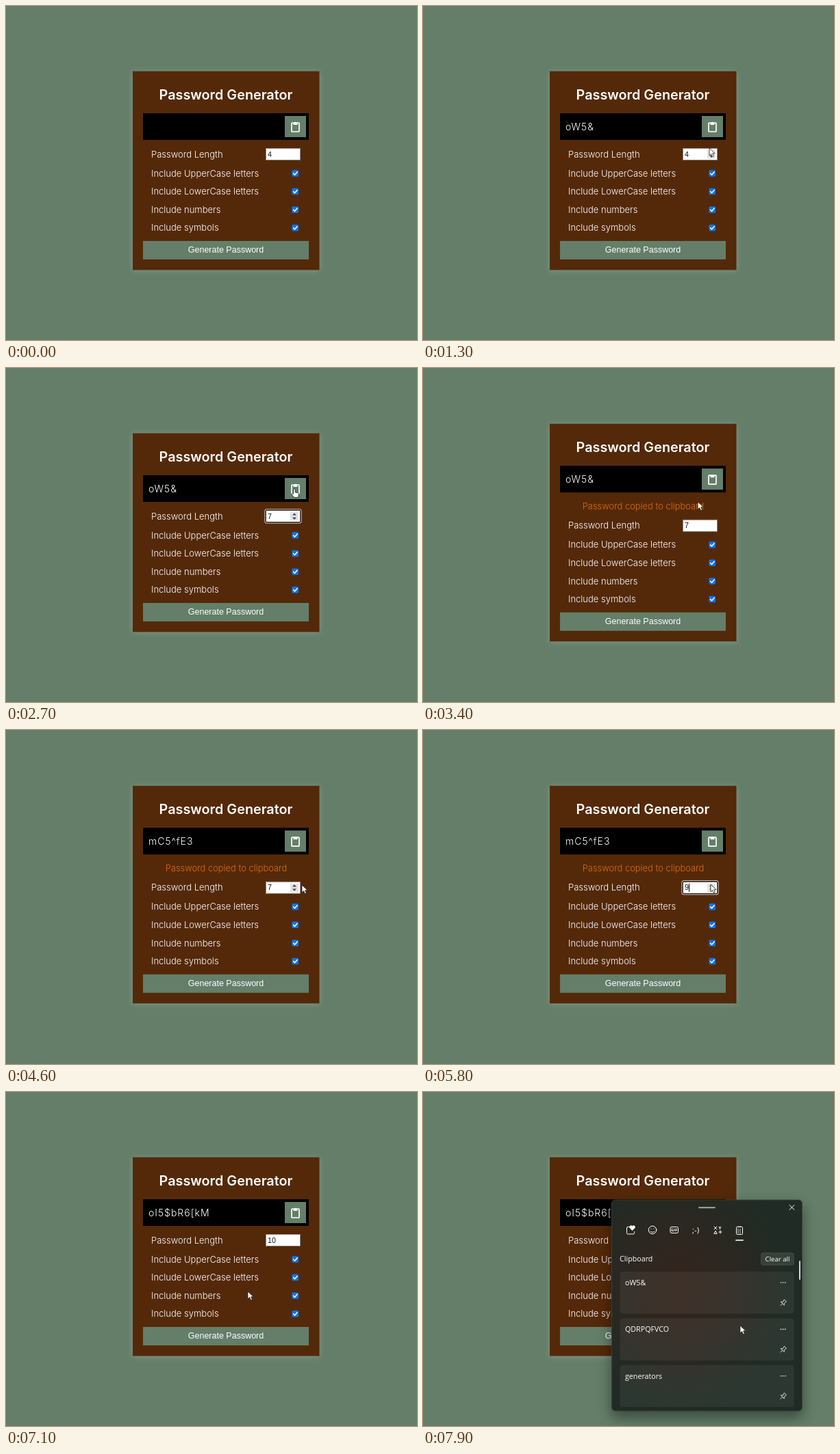
An HTML page that plays this animation: 600x489 px, repeating every 8 s.

```html
<!DOCTYPE html>
<html lang="en">
<head>
<meta charset="utf-8">
<title>Password Generator</title>
<style>
html, body { margin: 0; width: 100%; height: 100%; overflow: hidden; background: #647e69; }
svg { display: block; width: 100vw; height: 100vh; font: 350 13px Inter, sans-serif; fill: #fff; }
.mid { text-anchor: middle; }
.ui { font-family: "Liberation Sans", Arial, sans-serif; font-weight: 400; }
.green { fill: #647e69; }
.line { fill: none; stroke: #fff; stroke-linecap: round; stroke-linejoin: round; }
.pointer { stroke: #222; stroke-width: .8; }
#card { fill: #542909; filter: drop-shadow(0 1.5px 4px rgba(255,255,255,.2)); }
#panel { font: 500 10.7px "Open Sans", sans-serif; filter: drop-shadow(0 9px 10px rgba(0,0,0,.42)); }
</style>
</head>
<body>
<svg viewBox="0 0 600 489">
  <defs>
    <radialGradient id="tint" cx=".35" cy=".42" r=".6">
      <stop offset="0" stop-color="#34251d"/>
      <stop offset=".5" stop-color="#2b2721"/>
      <stop offset="1" stop-color="#202b25"/>
    </radialGradient>
  </defs>
  <rect id="card" x="185" width="272.5"/>
  <g id="top">
    <text class="mid" x="321" y="137" font-size="19.8" font-weight="600">Password Generator</text>
    <rect x="200" y="157" width="242" height="39" fill="#000"/>
    <text id="word" x="208" y="182" font-size="14" letter-spacing="1"></text>
    <rect class="green" x="407" y="161" width="31" height="31"/>
    <rect class="line" x="417" y="171" width="11" height="13" rx="1" stroke-width="1.7"/>
    <path d="M419.5 174v-3h1.5a1.6 1.8 0 0 1 3 0h1.5v3z"/>
  </g>
  <text id="note" class="mid" x="321.5" y="206.5" font-size="12.9" fill="#e06a10">Password copied to clipboard</text>
  <g id="rows">
    <text x="212" y="221.5">Password Length</text>
    <rect id="field" x="379.5" y="208.5" width="50" height="17" stroke="#8a857f"/>
    <g id="ring" fill="none">
      <rect x="378" y="207" width="53" height="20" rx="2" stroke="#fff"/>
      <rect x="379" y="208" width="51" height="18" rx="1" stroke="#000"/>
    </g>
    <text id="size" class="ui" x="382" y="220.7" font-size="10.7" fill="#111"></text>
    <path id="caret" d="M388.5 211v12" stroke="#000"/>
    <g id="spin">
      <rect x="415" y="211" width="12" height="12.5" fill="#e4e4e4"/>
      <path d="M418 215.6l3-3.2 3 3.2zM418 218.8l3 3.2 3-3.2z" fill="#444"/>
    </g>
    <g id="checks"></g>
    <rect class="green" x="200" y="344" width="242" height="27"/>
    <text class="ui mid" x="321" y="361.3" font-size="12.5">Generate Password</text>
  </g>
  <g id="panel">
    <rect x="275.5" y="158" width="278" height="309" rx="5" fill="url(#tint)" stroke="#3c4640" stroke-width=".8"/>
    <path class="line" d="M403 169.3h23" stroke-width="2" opacity=".6"/>
    <path class="line" d="M535 165.5l7 7m0-7l-7 7"/>
    <path class="line" d="M302 197.5h-3q-1.500 0-1.500 1.500v7.500q0 1.500 1.500 1.500h8q1.500 0 1.500-1.500v-2"/>
    <path d="M305.5 203l-4-4a2.2 2.2 0 0 1 4-2.500a2.2 2.2 0 0 1 4 2.500z"/>
    <circle class="line" cx="335" cy="202" r="5.8"/>
    <path class="line" d="M332 204q3 3 6 0M333 200v.3M337 200v.3"/>
    <rect class="line" x="361" y="197.5" width="11.5" height="9" rx="2"/>
    <text class="mid" x="366.7" y="204.2" font-size="5.8" font-weight="700">GIF</text>
    <text class="mid" x="398" y="205.5" font-size="11.5">;-)</text>
    <path class="line" d="M425 197l4 4m0-4l-4 4M432 198h3m-1.500 0v3M425 207l2-3.500 2 3.500zM432 205h4m-2-2v4"/>
    <rect class="line" x="457.5" y="197.5" width="9" height="11" rx="1"/>
    <path class="line" d="M460 197h4M459.5 201h5M459.5 203.5h5M459.5 206h5" stroke-dasharray="1 2"/>
    <path class="line" d="M457 217h10" stroke-width="2" opacity=".8"/>
    <text x="287" y="248">Clipboard</text>
    <rect x="493.5" y="235.5" width="48" height="18" rx="3" fill-opacity=".1" stroke="#454c47" stroke-width=".8"/>
    <text class="mid" x="517.5" y="248.2" font-size="9.6">Clear all</text>
    <path class="line" d="M550 248v26" stroke-width="2" opacity=".8"/>
    <g id="clips"></g>
  </g>
  <g id="cursor">
    <path id="arrow" class="pointer" d="M0 0v11l2.600-2.400 1.800 4 2-.9-1.800-3.900h3.600z"/>
    <path id="hand" class="pointer" d="M-1.400 1a1.300 1.300 0 0 1 2.600 0v4l4 .8q1.600.5 1.300 2.200l-.8 4.500h-6l-4-5q.6-1.600 2.900 0z"/>
  </g>
</svg>
<script>
const $ = id => document.getElementById(id);
const show = (id, on) => $(id).style.display = on ? '' : 'none';
const shift = (id, x, y) => $(id).setAttribute('transform', `translate(${x} ${y})`);

const options = ['UpperCase letters', 'LowerCase letters', 'numbers', 'symbols'];
$('checks').innerHTML = options.map((name, i) => `
  <g transform="translate(0 ${245 + i * 26.6})">
    <text x="212" y="4.5">Include ${name}</text>
    <rect x="417.5" y="-4.8" width="9.5" height="9.5" rx="1.6" fill="#0a75f5"/>
    <path class="line" d="M419.5 0l2 2.2 3.7-4.3" stroke-width="1.5"/>
  </g>`).join('');

$('clips').innerHTML = ['oW5&amp;', 'QDRPQFVCO', 'generators'].map((text, i) => `
  <g transform="translate(0 ${i * 68.4})">
    <rect x="287.5" y="263" width="254" height="61.5" rx="4" fill-opacity=".055"/>
    <text x="295" y="283">${text}</text>
    <path class="line" d="M522.5 279h.1m3 0h.1m3 0h.1" stroke-width="1.6"/>
    <path class="line" transform="translate(525.5 309) rotate(45)" stroke-width=".8"
      d="M-2-5h4l-.5 4 2 2h-7l2-2zM0 1v4"/>
  </g>`).join('');

const copy = [421, 177], button = [230, 359], spinner = [418, 208], lowSpinner = [420, 226];
// arrival time, place, optional time of leaving
const visits = [
  [100, [449, 98]], [300, button, 700], [1000, [475, 290]], [1300, spinner, 1800],
  [2300, button], [2500, [447, 126]], [2700, copy, 3300], [3800, button, 4200],
  [4600, [432, 227]], [5000, button], [5300, lowSpinner, 5800], [6100, spinner, 6400],
  [6700, button, 6800], [7100, [353, 292]], [7500, button, 7600], [7900, [463, 342]]];
const spins = [1500, 1600, 1700, 5500, 5700, 6200];
const words = { 0: '', 700: 'oW5&', 4200: 'mC5^fE3', 6800: 'oI5$bR6[kM' };

function pointer(t) {
  const next = visits.findIndex(v => v[0] > t);
  const b = visits.at(next), a = visits[Math.max(0, next - 1)] || b;
  const [arrive, from, leave = arrive] = a;
  const p = Math.min(1, Math.max(0, (t - leave) / (b[0] - leave || 1)));
  const ease = next < 0 ? 1 : p * p * (3 - 2 * p);
  return from.map((v, i) => v + (b[1][i] - v) * ease);
}

function draw(t) {
  const copied = t >= 3300 && t < 6000;
  const d = copied ? 13.8 : 0;
  $('card').setAttribute('y', 95.5 - d);
  $('card').setAttribute('height', 291 + 2 * d);
  shift('top', 0, -d);
  shift('rows', 0, d);
  show('note', copied);
  $('word').textContent = words[Object.keys(words).filter(k => k <= t).pop()];
  $('size').textContent = 4 + spins.filter(k => k <= t).length;

  const [x, y] = pointer(t);
  const inside = (l, u, r, b) => x >= l && x <= r && y >= u && y <= b;
  const focus = t >= 1500 && t < 3300 || t >= 5500 && t < 6700;
  show('ring', focus);
  show('caret', focus && t % 1000 >= 800 && t > 5000 && t < 6000);
  show('spin', focus || inside(377, 207 + d, 433, 228 + d));
  const open = t >= 7700;
  const hand = !open && (inside(407, 161 - d, 438, 192 - d) || inside(200, 344 + d, 442, 371 + d));
  show('cursor', t >= 100);
  show('hand', hand);
  show('arrow', !hand);
  shift('cursor', x, y);

  const rise = Math.min(1, (t - 7600) / 200);
  show('panel', open);
  $('panel').style.opacity = rise;
  shift('panel', 0, 24 * (1 - rise));
}

// The picture advances ten times a second.
function tick() {
  draw(Math.floor(performance.now() % 8000 / 100) * 100);
  requestAnimationFrame(tick);
}
tick();
</script>
</body>
</html>
```
